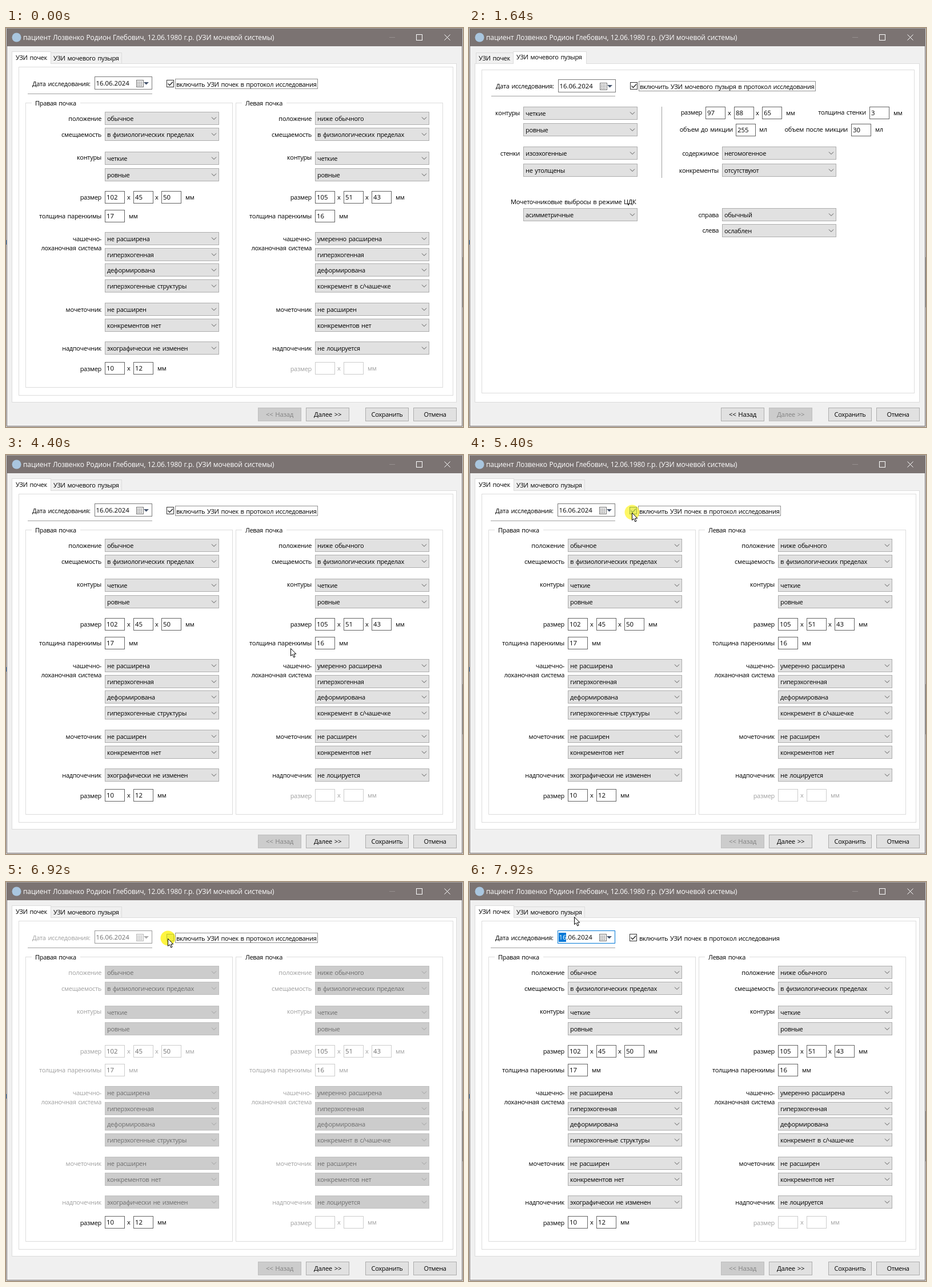
These frames come from a looping animation (800 by 700 pixels, 8000 ms). An HTML page with a canvas:

```html
<!DOCTYPE html>
<html lang="ru">
<head>
<meta charset="utf-8">
<title>УЗИ мочевой системы</title>
<style>
  html, body { margin: 0; width: 100%; height: 100%; overflow: hidden; background: #f0f0f0; }
  canvas { display: block; }
</style>
</head>
<body>
<canvas id="stage" width="800" height="700"></canvas>
<script>
const ctx = document.getElementById('stage').getContext('2d');
const LOOP = 8000;
const FONT = '"Open Sans", "Noto Sans", sans-serif';
const INK = '#000', GREY = '#a0a0a0', EDGE = '#dcdcdc';

// Pointer path: time, x, y
const PATH = [
  [4280, 645, 322], [4440, 450, 345], [4600, 325, 363], [4760, 300, 262],
  [4920, 289, 174], [5119, 289, 174], [5120, 285, 101], [6080, 285, 101],
  [6160, 284, 109], [6300, 284, 109], [6440, 283, 99], [7480, 283, 99], [7900, 184, 61]
];
const PRESSES = [[5280, 5480], [6640, 7000]];

const KIDNEYS = [
  { dx: 0, title: 'Правая почка', size: ['102', '45', '50'], wall: '17', gland: ['10', '12'],
    picks: ['обычное', 'в физиологических пределах', 'четкие', 'ровные', 'не расширена', 'гиперэхогенная',
      'деформирована', 'гиперэхогенные структуры', 'не расширен', 'конкрементов нет', 'эхографически не изменен'] },
  { dx: 368, title: 'Левая почка', size: ['105', '51', '43'], wall: '16', gland: ['', ''],
    picks: ['ниже обычного', 'в физиологических пределах', 'четкие', 'ровные', 'умеренно расширена', 'гиперэхогенная',
      'деформирована', 'конкремент в с/чашечке', 'не расширен', 'конкрементов нет', 'не лоцируется'] }
];
const PICK_Y = [147, 175, 217, 246, 358, 386, 413, 441, 482, 510, 550];
const LABELS = [
  ['положение', 159], ['смещаемость', 187], ['контуры', 227], ['размер', 297], ['толщина паренхимы', 330],
  ['чашечно-', 370], ['лоханочная система', 386], ['мочеточник', 494], ['надпочечник', 562]
];

const clamp = v => Math.max(0, Math.min(1, v));

function pointer(t) {
  if (t < PATH[0][0]) return null;
  for (let i = 1; i < PATH.length; i++) {
    const [t0, x0, y0] = PATH[i - 1], [t1, x1, y1] = PATH[i];
    if (t < t1) {
      const k = (t - t0) / (t1 - t0);
      return [x0 + (x1 - x0) * k, y0 + (y1 - y0) * k];
    }
  }
  return PATH[PATH.length - 1].slice(1);
}

// Hover glow that lingers and fades after the pointer leaves
function hover(t, x, y, w, h) {
  const fade = 200;
  for (let s = 0; s < fade; s += 20) {
    const p = pointer(t - s);
    if (p && p[0] >= x && p[0] < x + w && p[1] >= y && p[1] < y + h) return 1 - s / fade;
  }
  return 0;
}

function withAlpha(a, draw) {
  if (a <= 0) return;
  ctx.save();
  ctx.globalAlpha = a;
  draw();
  ctx.restore();
}

function rect(x, y, w, h, color) {
  ctx.fillStyle = color;
  ctx.fillRect(x, y, w, h);
}

function box(x, y, w, h, fill, edge) {
  rect(x, y, w, h, edge);
  rect(x + 1, y + 1, w - 2, h - 2, fill);
}

function line(points, color, width = 1) {
  ctx.strokeStyle = color;
  ctx.lineWidth = width;
  ctx.beginPath();
  points.forEach(([x, y]) => ctx.lineTo(x, y));
  ctx.stroke();
}

// y is the middle of the text line
function text(str, x, y, { color = INK, align = 'left', size = 11, gap = -0.3, space = 1.2 } = {}) {
  const digits = /^[\d.]+$/.test(str);
  ctx.font = `${digits ? 11.4 : size}px ${FONT}`;
  ctx.letterSpacing = `${digits ? 0 : gap}px`;
  ctx.wordSpacing = `${space}px`;
  ctx.textAlign = align;
  ctx.fillStyle = color;
  ctx.fillText(str, x, y + 4);
}

const label = (str, x, y, on = true) => text(str, x, y, { align: 'right', color: on ? INK : GREY });
const note = (str, x, y, on = true) => text(str, x, y, { color: on ? INK : GREY });

function combo(str, x, y, t, on = true) {
  const w = 200, h = 23;
  box(x, y, w, h, on ? '#e1e1e1' : '#ccc', on ? '#adadad' : '#bfbfbf');
  if (on) withAlpha(hover(t, x, y, w, h), () => box(x, y, w, h, '#e5f1fb', '#0078d7'));
  text(str, x + 4, y + 12, { color: on ? INK : '#6d6d6d' });
  const cx = x + 191, cy = y + 9.5;
  line([[cx - 4, cy], [cx, cy + 4], [cx + 4, cy]], on ? '#555' : GREY);
}

function field(str, x, y, on = true) {
  box(x, y, 35, 22, '#fff', on ? '#646464' : '#ccc');
  text(str, x + 3, y + 10.5, { color: on ? INK : '#6d6d6d' });
}

function fieldRow(values, x, y, on) {
  values.forEach((v, i) => {
    const fx = x + Math.round(i * 49.6);
    field(v, fx, y, on);
    if (i) note('x', fx - 11, y + 11, on);
  });
  note('мм', x + Math.round((values.length - 1) * 49.6) + 42, y + 11, on);
}

function button(str, x, on, size = 11) {
  box(x, 666, 76, 24, on ? '#e1e1e1' : '#ccc', on ? '#adadad' : '#bfbfbf');
  text(str, x + 38, 678, { align: 'center', size, color: on ? INK : '#838383' });
}

function navButton(str, x, amount) {
  button(str, x, false, 11.4);
  withAlpha(amount, () => button(str, x, true, 11.4));
}

function chrome() {
  rect(0, 0, 800, 700, '#d4d4d4');
  rect(0, 0, 800, 1, '#a9a5a5');
  rect(1, 1, 798, 698, '#7b7372');
  rect(2, 32, 796, 666, '#f0f0f0');
  rect(0, 372, 1, 8, '#3d7ab8');
  rect(799, 402, 1, 88, '#a0a0a0');
  ctx.fillStyle = '#a9c6df';
  ctx.beginPath();
  ctx.arc(18.5, 16.5, 8, 0, 7);
  ctx.fill();
  text('пациент Лозвенко Родион Глебович, 12.06.1980 г.р. (УЗИ мочевой системы)', 30, 17,
    { color: '#fff', size: 12, gap: -0.1, space: 0.4 });
  rect(671, 16, 10, 1, '#968f8f');
  ctx.strokeStyle = '#fff';
  ctx.lineWidth = 1;
  ctx.strokeRect(718.5, 11.5, 10, 10);
  line([[767.5, 11.5], [777.5, 21.5]], '#fff');
  line([[777.5, 11.5], [767.5, 21.5]], '#fff');
}

function tab(x, y, w, active) {
  box(x, y, w, 63 - y, active ? '#fff' : '#f0f0f0', EDGE);
  if (active) rect(x + 1, 62, w - 2, 1, '#fff');
}

function tabs(bladder) {
  box(10, 62, 779, 595, '#fff', EDGE);
  if (bladder) {
    tab(12, 43, 66, false);
    tab(77, 41, 129, true);
    box(22, 73, 758, 568, '#fff', EDGE);
  } else {
    tab(78, 43, 125, false);
    tab(10, 41, 69, true);
    box(22, 68, 761, 577, '#fff', EDGE);
  }
  text('УЗИ почек', 17, bladder ? 53 : 52);
  text('УЗИ мочевого пузыря', 83, bladder ? 51 : 53);
}

function datePicker(x, y, on, focus) {
  const ink = on ? INK : '#6d6d6d', soft = on ? '#777' : '#bbb';
  box(x, y, 101, 23, '#fff', focus ? '#0078d7' : on ? '#7a7a7a' : '#999');
  text('16.06.2024', x + 2.5, y + 11.5, { color: ink });
  if (focus) {
    rect(x + 2, y + 4, 13, 16, '#0078d7');
    text('16', x + 2.5, y + 11.5, { color: '#fff' });
  }
  box(x + 73, y + 6, 13, 13, '#eee', soft);
  for (let i = 0; i < 9; i++) rect(x + 75 + i % 3 * 3, y + 9 + Math.floor(i / 3) * 3, 2, 2, on ? '#aaa' : '#ccc');
  ctx.fillStyle = on ? '#43536b' : '#aaa';
  ctx.beginPath();
  ctx.moveTo(x + 86, y + 10);
  ctx.lineTo(x + 95, y + 10);
  ctx.lineTo(x + 90.5, y + 14.5);
  ctx.fill();
}

function checkbox(x, y, s) {
  const mark = color => {
    if (s.checked) line([[x + 2.5, y + 6.5], [x + 5.5, y + 9.5], [x + 11, y + 3.5]], color, 1.3);
  };
  box(x, y, 13, 13, '#fff', '#333');
  mark('#222');
  withAlpha(s.hover, () => {
    box(x, y, 13, 13, s.pressed ? '#cce4f7' : '#fff', s.pressed ? '#005499' : '#0078d7');
    mark(s.pressed ? '#005499' : '#0078d7');
  });
}

function header(caption, focusW, dx, dy, pickerY, s) {
  text('Дата исследования:', 46 + dx, 98 + dy, { color: s.on ? INK : GREY });
  datePicker(155 + dx, pickerY, s.on, s.dateFocus);
  rect(38 + dx, 115 + dy, 218 - dx, 1, GREY);
  checkbox(281 + dx, 91 + dy, s);
  text(caption, 298 + dx, 98.5 + dy);
  if (!s.dateFocus) {
    ctx.save();
    ctx.setLineDash([1, 1]);
    ctx.strokeStyle = '#222';
    ctx.lineWidth = 1;
    ctx.strokeRect(296.5 + dx, 89.5 + dy, focusW, 17);
    ctx.restore();
  }
}

function kidneyPage(t, s) {
  header('включить УЗИ почек в протокол исследования', 249, 0, 0, 85, s);
  for (const k of KIDNEYS) {
    const { dx } = k, x = 173 + dx, on = s.on, glandOn = !!k.gland[0];
    box(34 + dx, 131, 363, 500, '#fff', EDGE);
    rect(45 + dx, 131, dx ? 78 : 85, 1, '#fff');
    text(k.title, 51 + dx, 132);
    LABELS.forEach(([str, y]) => label(str, 167 + dx, y, on));
    k.picks.forEach((str, i) => combo(str, x, PICK_Y[i], t, on));
    fieldRow(k.size, x, 286, on);
    fieldRow([k.wall], x, 319, on);
    label('размер', 167 + dx, 598, glandOn);
    fieldRow(k.gland, x, 586, glandOn);
  }
}

function bladderPage(t, s) {
  header('включить УЗИ мочевого пузыря в протокол исследования', 309, 1, 4, 90, s);
  rect(337, 138, 1, 125, GREY);
  label('контуры', 89, 149);
  label('стенки', 89, 220);
  label('содержимое', 437, 220);
  label('конкременты', 437, 250);
  label('справа', 437, 328);
  label('слева', 437, 355);
  text('Мочеточниковые выбросы в режиме ЦДК', 73, 304.5);
  [['четкие', 138], ['ровные', 167], ['изоэхогенные', 208], ['не утолщены', 238], ['асимметричные', 316]]
    .forEach(([str, y]) => combo(str, 95, y, t));
  [['негомогенное', 208], ['отсутствуют', 238], ['обычный', 316], ['ослаблен', 344]]
    .forEach(([str, y]) => combo(str, 443, y, t));
  label('размер', 408, 148);
  fieldRow(['97', '88', '65'], 414, 138, true);
  label('толщина стенки', 695, 148);
  fieldRow(['3'], 701, 138, true);
  label('объем до микции', 462, 178);
  field('255', 467, 168);
  note('мл', 508, 178);
  label('объем после микции', 663, 178);
  field('30', 669, 168);
  note('мл', 711, 178);
}

function halo(t, x, y) {
  for (const [down, up] of PRESSES) {
    const a = Math.min(clamp((t - down + 40) / 200), 1 - clamp((t - up) / 240));
    withAlpha(a * 0.75, () => {
      ctx.fillStyle = '#fff200';
      ctx.beginPath();
      ctx.arc(x + 0.5, y - 0.5, 13, 0, 7);
      ctx.fill();
    });
  }
}

function arrow(x, y) {
  ctx.save();
  ctx.translate(Math.round(x) + 0.5, Math.round(y) + 0.5);
  ctx.beginPath();
  [[0, 0], [0, 13], [3, 10.3], [5.3, 15.5], [7.5, 14.5], [5.3, 9.5], [9.3, 9.5]]
    .forEach(p => ctx.lineTo(...p));
  ctx.closePath();
  ctx.fillStyle = '#fff';
  ctx.fill();
  ctx.strokeStyle = '#000';
  ctx.lineWidth = 1;
  ctx.stroke();
  ctx.restore();
}

function render(t) {
  const bladder = t >= 1280 && t < 3120;
  const on = t < 5480 || t >= 7000;
  const back = t < 3120 ? clamp((t - 1280) / 360) : 1 - clamp((t - 3120) / 360);
  const state = {
    on,
    checked: on,
    dateFocus: t >= 7000,
    pressed: PRESSES.some(([a, b]) => t >= a && t < b),
    hover: hover(t, 281, 91, 14, 14)
  };
  chrome();
  tabs(bladder);
  (bladder ? bladderPage : kidneyPage)(t, state);
  navButton('<< Назад', 441, back);
  navButton('Далее >>', 525, 1 - back);
  button('Сохранить', 629, true);
  button('Отмена', 713, true);
  const p = pointer(t);
  if (p) {
    halo(t, ...p);
    arrow(...p);
  }
}

const start = performance.now();
function tick() {
  render((performance.now() - start) % LOOP);
  requestAnimationFrame(tick);
}
tick();
</script>
</body>
</html>
```
